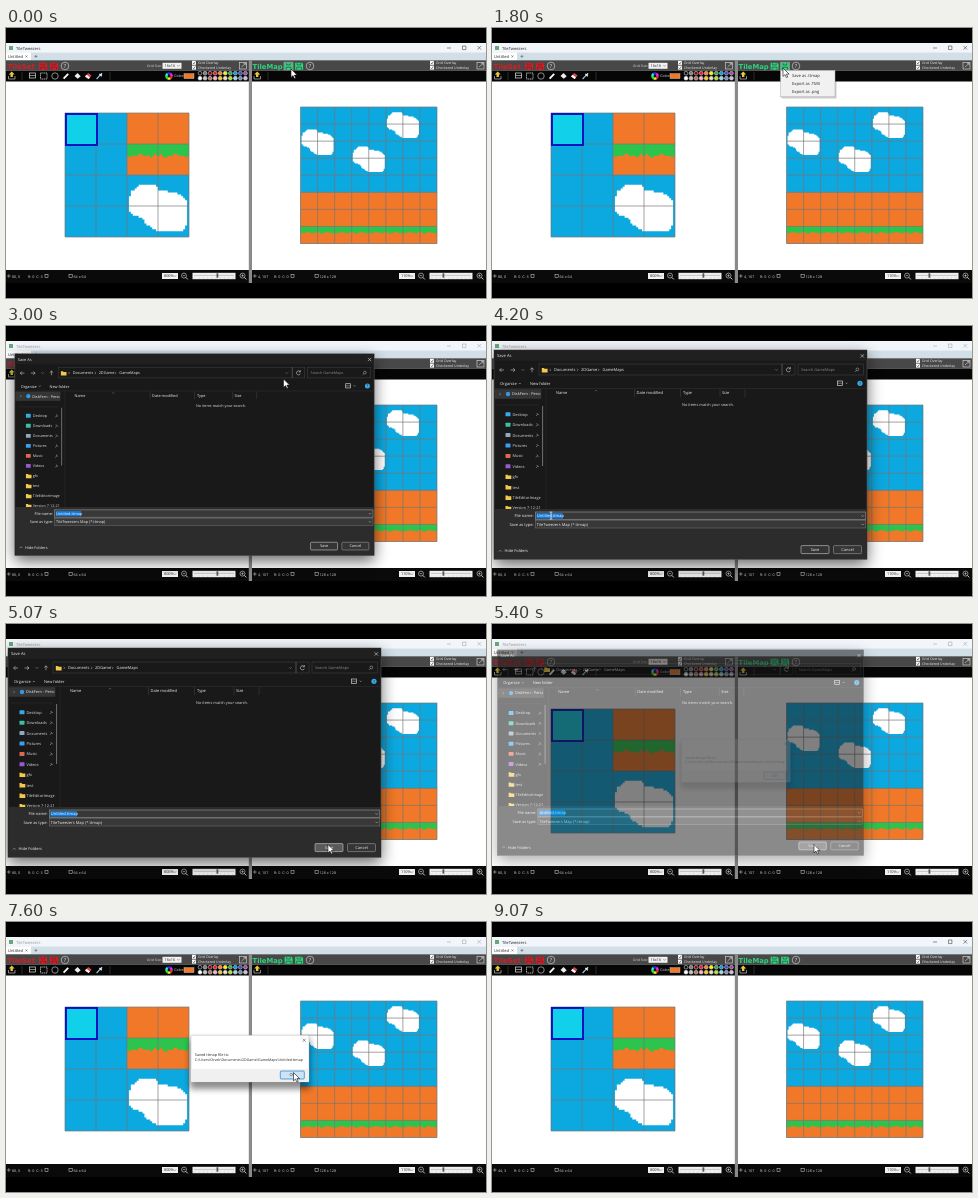
These frames come from a looping animation (480x270 px, 9.59 s). An HTML page:

```html
<!DOCTYPE html>
<html lang="en">
<head>
<meta charset="utf-8">
<title>Saving a tile map</title>
<style>
html, body { margin: 0; width: 100%; height: 100%; overflow: hidden; background: #000; }
svg { display: block; width: 100vw; height: 100vh; }
text { font-family: "Open Sans", "Noto Sans", sans-serif; text-rendering: geometricPrecision; white-space: pre; }
text.logo { font-family: "DejaVu Sans", sans-serif; font-weight: bold; }
</style>
</head>
<body>
<svg id="stage" viewBox="0 0 480 270"></svg>
<script>
const LOOP = 9590, STEP = 1000 / 15;
const BLUE = '#0ca8e0', ORANGE = '#f07828', GREEN = '#2cc44c', RED = '#d81c24', MINT = '#2cd47c';

const rect = (x, y, w, h, fill, extra = '') =>
  `<rect x="${x}" y="${y}" width="${w}" height="${h}" fill="${fill}" ${extra}/>`;
const text = (x, y, s, fill = '#eee', size = 4, extra = '') =>
  `<text x="${x}" y="${y}" fill="${fill}" font-size="${size}" ${extra}>${s}</text>`;
const line = (d, stroke = '#ddd', width = 0.6, extra = '') =>
  `<path d="${d}" fill="none" stroke="${stroke}" stroke-width="${width}" ${extra}/>`;
const ring = (x, y, r, stroke = '#ddd', fill = 'none') =>
  `<circle cx="${x}" cy="${y}" r="${r}" fill="${fill}" stroke="${stroke}" stroke-width=".6"/>`;
const group = (body, extra = '') => `<g ${extra}>${body}</g>`;
const range = n => [...Array(n).keys()];

// Interpolates a list of [key, ...values] rows.
function track(rows, k, ease = p => p) {
  if (k <= rows[0][0]) return rows[0].slice(1);
  for (let i = 1; i < rows.length; i++) {
    const a = rows[i - 1], b = rows[i];
    if (k <= b[0]) {
      const p = ease((k - a[0]) / (b[0] - a[0]));
      return a.slice(1).map((v, j) => v + (b[j + 1] - v) * p);
    }
  }
  return rows[rows.length - 1].slice(1);
}

// Tile art in image pixels; one tile is 16 by 16.
const cloudEdges = [[5, 6, 14], [7, 4, 15], [8, 2, 20], [9, 2, 25], [11, 1, 28], [13, 1, 30],
  [18, 1, 30], [20, 3, 30], [22, 8, 30], [25, 10, 30], [28, 15, 28]];
function cloud(x, y) {
  const rows = range(24).map(i => [i + y + 5, ...track(cloudEdges, i + 5).map(Math.round)]);
  const right = rows.map(([top, , r]) => `H${x + r + 1}V${top + 1}`).join('');
  const left = rows.reverse().map(([top, l]) => `H${x + l}V${top}`).join('');
  return `<path d="M${x + 6} ${y + 5}${right}${left}z" fill="#fff"/>`;
}
function grass(x, y) {
  const edge = range(32).map(i => {
    const depth = Math.round(5.9 + 0.55 * Math.sin(i * 0.7) + 0.3 * Math.sin(i * 1.7));
    return `V${y + depth}H${x + i + 1}`;
  }).join('');
  return `<path d="M${x} ${y}${edge}V${y}z" fill="${GREEN}"/>`;
}

function grid(x, y, size, cells) {
  const step = size / cells;
  const d = range(cells + 1).map(i =>
    `M${x + i * step} ${y}v${size}M${x} ${y + i * step}h${size}`).join('');
  return line(d, '#767676', 0.8, 'opacity=".85"');
}

function tileSet() {
  const art = rect(0, 0, 64, 64, BLUE) + rect(32, 0, 32, 32, ORANGE) + grass(32, 16) + cloud(32, 32);
  return group(art, 'transform="translate(59 85) scale(1.9375)"') + grid(59, 85, 124, 4) +
    rect(60, 86, 31, 31, '#10d0ea', 'stroke="#0814c0" stroke-width="2"');
}

function tileMap() {
  const art = rect(0, 0, 128, 128, BLUE) + rect(0, 80, 128, 48, ORANGE) +
    range(4).map(i => grass(i * 32, 112)).join('') +
    cloud(0, 16) + cloud(48, 32) + cloud(80, 0);
  return group(art, 'transform="translate(294.5 79) scale(1.0664)"') + grid(294.5, 79, 136.5, 8);
}

const disk = (x, color, id = '') => group(
  rect(x - 0.5, 33.8, 10, 8.5, '#8a8a8a', 'class="hover" opacity="0"') +
  `<path d="M${x + 0.6} 34.8h6.8l1.2 1.2v5.8h-8z" fill="${color}"/>` +
  line(`M${x + 2.6} 35.2v1.8h3.6v-1.8M${x + 2.2} 41.6v-2.4h4.8v2.4`, '#333', 0.6), id);
const help = x => ring(x, 38, 3.8) + text(x, 40, '?', '#ddd', 5.5, 'text-anchor="middle"');
const check = (x, y, label) => rect(x, y, 4, 4, '#fff') +
  line(`M${x + 0.8} ${y + 2}l1 1.1 1.6-2.3`, '#222', 0.6) + text(x + 6, y + 3.4, label, '#eee', 3.5);
const checks = x => check(x, 32.8, 'Grid Overlay') + check(x, 37.6, 'Checkered Underlay');
const expand = x => rect(x, 34.5, 7, 6.5, 'none', 'stroke="#ddd" stroke-width=".6"') +
  line(`M${x + 2} 39l4-3.5M${x + 4} 35.3h2.2v2`);
const upload = x => line(`M${x} 48v3h6.5v-3`) +
  `<path d="M${x + 3.2} 43.4l3 3h-1.8v2.6h-2.4v-2.6h-1.8z" fill="#e8c83c"/>`;
const combo = (x, y, w, label) => rect(x, y, w, 6, '#f0f0f0') + text(x + 2, y + 4.4, label, '#222', 3.8) +
  line(`M${x + w - 4} ${y + 2.5}l1 1 1-1`, '#333', 0.5);
const lens = (x, sign) => ring(x, 247.6, 2.5) + line(`M${x + 1.8} 249.4l2 2`, '#ddd', 0.9) +
  line(`M${x - 1.2} 247.6h2.4${sign > 0 ? `M${x} 246.4v2.4` : ''}`);

function statusBar(x, w, size, ids) {
  const page = x + 63;
  return rect(x, 242, w, 13, '#0a0a0a') +
    line(`M${x + 1} 248h3.6M${x + 2.8} 246.2v3.6`, '#ddd', 0.5) +
    text(x + 6, 249.5, '', '#ddd', 3.7, `id="${ids[0]}"`) +
    text(x + 22, 249.5, '', '#ddd', 3.7, `id="${ids[1]}"`) +
    rect(x + 39, 246.5, 3, 3.2, 'none', 'stroke="#ddd" stroke-width=".5"') +
    rect(page, 246.5, 3.2, 3, 'none', 'stroke="#ddd" stroke-width=".5"') +
    text(page + 4.5, 249.5, size, '#ddd', 3.7);
}
const zoomBar = (x, zoom, thumb) => combo(x, 245, 16, zoom) + lens(x + 22, -1) + lens(x + 80.5, 1) +
  rect(x + 30.5, 244.8, 43, 6.4, '#f0f0f0') + line(`M${x + 32} 247.4h40`, '#bbb', 0.8) +
  line(range(10).map(i => `M${x + 33 + i * 4.2} 249.6v1`).join(''), '#999', 0.4) +
  rect(thumb, 245.3, 1.8, 4.4, '#555');

function palette() {
  const top = ['#111', '#7f7f7f', '#880015', '#ed1c24', '#ff7f27', '#fff200', '#22b14c', '#00a2e8', '#3f48cc', '#a349a4'];
  const low = ['#fff', '#c3c3c3', '#b97a57', '#ffaec9', '#ffc90e', '#efe4b0', '#b5e61d', '#99d9ea', '#7092be', '#c8bfe7'];
  return [top, low].map((row, r) => row.map((c, i) => ring(194 + i * 5.05, 45.2 + r * 5, 1.9, '#ccc', c)).join('')).join('');
}

function tools() {
  return upload(2.5) + line('M16 44v8M104 44v8', '#444', 0.6) +
    rect(23.5, 45, 6, 5, 'none', 'stroke="#ddd" stroke-width=".7"') + line('M23.5 47.5h6') +
    rect(34.5, 45, 6.5, 6, 'none', 'stroke="#ddd" stroke-width=".8" stroke-dasharray="1.2 .6"') +
    ring(49, 48, 3.2) +
    line('M57.6 50.6l4.6-4.8', '#fff', 1.8) +
    `<path d="M68.5 48l3-3 3.2 3.2-3 2.6z" fill="#eee"/>` +
    `<path d="M79 48.4l3.2-3.4 3.4 2.6-3 3.4z" fill="#e04848"/><path d="M79 48.4l1.6-1.7 3.4 2.7-1.4 1.6z" fill="#fff"/>` +
    line('M90.6 51l3.6-3.8', '#9cd0e8', 1.1) + line('M93.4 46l2.4 2.2M94.6 47l1.4-1.6', '#eee', 1.4);
}

function wheel(x, y) {
  return range(6).map(i => {
    const p = a => `${x + 3.8 * Math.cos(a)} ${y + 3.8 * Math.sin(a)}`;
    const a = i * Math.PI / 3;
    return `<path d="M${x} ${y}L${p(a)}A3.8 3.8 0 0 1 ${p(a + Math.PI / 3)}z" fill="hsl(${i * 60} 85% 55%)"/>`;
  }).join('') + `<circle cx="${x}" cy="${y}" r="1.4" fill="#111"/>`;
}

function appWindow() {
  return rect(0, 15, 480, 240, '#fff') +
    rect(0, 15, 480, 9.5, '#f2f6fa') + rect(3, 18, 4, 4, '#68a878') +
    group(text(10, 21.6, 'TileTweezers', 'currentColor', 4.1) +
      line('M441 20h4M456.5 18h3.4v3.6h-3.4zM471.5 18l3.6 3.6m0-3.6l-3.6 3.6', 'currentColor', 0.5), 'id="titleBar"') +
    rect(0, 24.5, 480, 8, '#d2dfe7') + rect(0, 24.5, 25, 8, '#fff') +
    text(2, 29.9, 'Untitled', '#222', 4) + line('M19.4 27.4l2 2m0-2l-2 2M28.4 28.4h3M29.9 26.9v3', '#444', 0.5) +
    rect(0, 32.3, 480, 10.2, '#484848') + rect(0, 42.5, 480, 11, '#060606') +
    text(1.5, 40.8, 'TileSet', RED, 7, 'class="logo"') +
    disk(32.5, RED) + disk(43.5, RED) + help(59) +
    text(141, 39.3, 'Grid Size:', '#ddd', 3.4) + combo(156.5, 34.8, 19, '16x16') + checks(186) + expand(233.5) +
    tools() + wheel(163, 48) + text(168.2, 49.3, 'Color:', '#eee', 3.6) +
    rect(178, 45.6, 10, 5, ORANGE, 'stroke="#ccc" stroke-width=".4"') + palette() +
    text(246.5, 40.8, 'TileMap', MINT, 6.8, 'class="logo"') +
    disk(278, MINT, 'id="saveIcon"') + disk(288.5, MINT, 'id="saveAsIcon"') + help(304) +
    checks(424) + expand(471) + upload(248) + line('M262 44v8', '#444', 0.6) +
    tileSet() + tileMap() +
    statusBar(0, 243, '64 x 64', ['leftPos', 'leftCell']) + zoomBar(156, '800%', 210.5) +
    statusBar(246, 234, '128 x 128', ['rightPos', 'rightCell']) + zoomBar(393, '110%', 436.5) +
    rect(242.8, 32.3, 3.2, 222.7, '#8a8a8a');
}

function menu() {
  return rect(289.5, 43.5, 55, 27, '#000', 'opacity=".2"') +
    rect(288.5, 42.3, 54.5, 26.5, '#f1f1f1', 'stroke="#aaa" stroke-width=".5"') +
    rect(289.2, 44, 53, 8, '#c4def4', 'id="menuHover"') +
    ['Save as .ttmap', 'Export as .TMX', 'Export as .png'].map((s, i) => text(300, 49.4 + i * 8, s, '#222', 4.1)).join('');
}

const folder = (x, y) => `<path d="M${x} ${y - 2}h2l.8.8h3v3.6h-5.8z" fill="#f4c84c"/>`;
const button = (x, y, w, label, id, fill, ink, stroke) =>
  rect(x, y, w, 8, fill, `id="${id}" rx="1" stroke="${stroke}" stroke-width=".6"`) +
  text(x + w / 2, y + 5.4, label, ink, 4, 'text-anchor="middle"');

function saveDialog() {
  const places = ['Desktop', 'Downloads', 'Documents', 'Pictures', 'Music', 'Videos',
    'gfx', 'test', 'TileEditorImage', 'Version 7-12-21'];
  const tints = ['#38a8e8', '#3cc0a0', '#90a8c0', '#38a0f0', '#e06850', '#9858d0'];
  const icon = (i, y) => i < 6 ? rect(13.5, y - 2, 5, 4, tints[i], 'rx=".6"') : folder(13.5, y);
  const sidebar = places.map((name, i) => {
    const y = 88.3 + i * 10.4;
    return icon(i, y) + text(20.5, y + 1.5, name, '#ddd', 3.9) +
      (i < 6 ? line(`M44 ${y + 1.6}l1.5-1.5M44.7 ${y - 1.3}l2 2`, '#bbb', 0.6) : '');
  }).join('');
  const chevron = x => line(`M${x} 42.7l1.2 1.2-1.2 1.2`, '#bbb', 0.5);
  return rect(2, 29, 373, 210, '#000', 'opacity=".6" filter="url(#deep)"') +
    rect(2, 24, 373, 209.3, '#191919', 'stroke="#555" stroke-width=".6"') +
    rect(2.3, 24.3, 372.4, 10.5, '#202020') + text(5, 31.4, 'Save As', '#eee', 4.1) +
    line('M368.6 28.2l3.4 3.4m0-3.4l-3.4 3.4', '#ddd', 0.6) +
    line('M12 44h-4.4m1.8-1.8l-1.8 1.8 1.8 1.8M18.6 44h4.4m-1.8-1.8l1.8 1.8-1.8 1.8M40 46.2v-4.4m-1.8 1.8l1.8-1.8 1.8 1.8', '#ccc', 0.6) +
    line('M29.5 43.2l1.4 1.4 1.4-1.4', '#999', 0.5) +
    rect(47, 38, 256, 11, '#191919', 'stroke="#444" stroke-width=".5"') + folder(49.8, 44) +
    [57.6, 85, 106].map(chevron).join('') +
    text(62, 45.4, 'Documents') + text(89, 45.4, '2DGame') + text(110.5, 45.4, 'GameMaps') +
    line('M283 43.2l1.4 1.4 1.4-1.4M290 38v11', '#888', 0.5) + line('M298.2 42.6a2.1 2.1 0 1 0 .2 2M298.4 41v1.8h-1.8', '#ccc', 0.6) +
    rect(306, 38, 65.5, 11, '#191919', 'stroke="#444" stroke-width=".5"') + text(309, 45.4, 'Search GameMaps', '#888', 3.9) +
    ring(365.4, 43.4, 1.4, '#aaa') + line('M364.4 44.5l-1.4 1.4', '#aaa') +
    text(8, 59, 'Organize') + line('M26.8 57l1 1 1-1', '#ccc', 0.5) + text(38, 59, 'New folder') +
    rect(345.5, 55, 5, 4.4, 'none', 'stroke="#ccc" stroke-width=".7"') + line('M345.5 57.2h5M353.6 56.7l1 1 1-1', '#ccc', 0.5) +
    `<circle cx="368" cy="57.3" r="2.6" fill="#38a8e8"/>` + text(368, 58.8, '?', '#111', 4, 'text-anchor="middle"') +
    line('M2.5 62.5h372', '#333', 0.5) +
    rect(2.5, 63.2, 46.8, 9.6, '#353535') + line('M7.5 66.8l1.2 1.2-1.2 1.2', '#aaa', 0.5) +
    `<circle cx="16" cy="68" r="2.2" fill="#3498e4"/>` +
    group(text(20, 69.4, 'DiskFern - Perso', '#eee', 3.9) + sidebar, 'clip-path="url(#sideClip)"') +
    line('M5 79h42', '#333', 0.4) + line('M50.6 80v60', '#888', 0.8) + line('M54 63v120', '#333', 0.5) +
    text(64, 68.4, 'Name') + text(144.5, 68.4, 'Date modified') + text(191, 68.4, 'Type') + text(230, 68.4, 'Size') +
    line('M142.5 63v8M188.5 63v8M228 63v8M253 63v8', '#444', 0.5) + line('M103 65.2l1-1 1 1', '#999', 0.5) +
    text(190, 79.5, 'No items match your search.', '#ddd', 3.9) +
    rect(2.3, 183, 372.4, 50, '#2c2c2c') +
    text(41.5, 191.3, 'File name:', '#eee', 4, 'text-anchor="end"') + text(41.5, 199.8, 'Save as type:', '#eee', 4, 'text-anchor="end"') +
    rect(43.3, 186, 330.5, 7.6, '#383838', 'stroke="#999" stroke-width=".6"') +
    rect(43.3, 194.6, 330.5, 7.4, '#383838', 'stroke="#777" stroke-width=".5"') +
    rect(44.4, 187.2, 26.4, 5.4, '#1478d4') + text(44.8, 191.3, 'Untitled.ttmap', '#fff') +
    text(44.8, 199.8, 'TileTweezers Map (*.ttmap)') +
    line('M369.5 189.3l1.2 1.2 1.2-1.2M369.5 197.8l1.2 1.2 1.2-1.2M7 225.6l1.4-1.4 1.4 1.4', '#ccc', 0.5) +
    text(12.5, 226.3, 'Hide Folders') +
    button(309, 219.6, 28, 'Save', 'saveButton', '#353535', '#eee', '#ccc') +
    button(341.5, 219.6, 28, 'Cancel', 'cancelButton', '#353535', '#eee', '#999');
}

function message() {
  return rect(184, 117, 120, 50, '#000', 'opacity=".45" filter="url(#soft)"') +
    rect(185, 113.3, 118, 46.7, '#fff', 'rx="1.5" stroke="#aaa" stroke-width=".4"') +
    rect(185.2, 147, 117.6, 12.8, '#f0f0f0') +
    line('M296.6 116.6l3.2 3.2m0-3.2l-3.2 3.2', '#333', 0.5) +
    text(188.8, 134.4, 'Saved ttmap file to:', '#222', 3.8) +
    text(188.8, 138.9, 'C:\\Users\\Orvek\\Documents\\2DGame\\GameMaps\\Untitled.ttmap', '#222', 3.6) +
    button(274.3, 149, 24, 'OK', 'okButton', '#e0e8f0', '#222', '#0868b8');
}

const blur = (id, deviation) => `<filter id="${id}" x="-20%" y="-40%" width="140%" height="180%">` +
  `<feGaussianBlur stdDeviation="${deviation}"/></filter>`;
document.getElementById('stage').innerHTML =
  `<defs><clipPath id="sideClip"><rect x="2" y="62" width="46.5" height="121"/></clipPath>` +
  blur('soft', 3) + blur('deep', 8) + `</defs>` +
  rect(0, 0, 480, 270, '#000') + appWindow() +
  group(menu(), 'id="menu"') + group(message(), 'id="message"') + group(saveDialog(), 'id="dialog"') +
  group('<path d="M0 0v8.4l2-1.8 1.4 3 1.3-.6-1.3-2.9h2.7z" fill="#fff" stroke="#111" stroke-width=".6"/>', 'id="arrow"') +
  group(line('M-1.4-3.4h2.8M0-3.4v7M-1.4 3.6h2.8', '#eee', 0.7), 'id="beam"');

const $ = Object.fromEntries([...document.querySelectorAll('[id]')].map(e => [e.id, e]));
const pointer = [[70, 285, 41], [330, 289, 41], [1000, 289, 41], [1400, 291, 40], [2000, 291, 40],
  [2330, 305, 47], [2670, 305, 47], [3000, 277.5, 53], [3670, 277.5, 53], [4200, 59, 189.5], [4670, 59, 189.5],
  [5070, 322, 220.5], [5600, 322, 220.5], [6200, 287, 151], [6670, 287, 151], [6734, 287.5, 150.5],
  [7800, 287.5, 150.5], [8530, 144, 91], [8740, 132, 48]];
const smooth = p => p * p * (3 - 2 * p);
const ramp = (t, start, length) => Math.min(1, Math.max(0, (t - start) / length));
const easeOut = p => 1 - (1 - p) ** 2;

function pose(el, opacity, scale, cx, cy) {
  el.setAttribute('opacity', opacity);
  el.setAttribute('display', opacity > 0 ? 'inline' : 'none');
  el.setAttribute('transform', `translate(${cx} ${cy}) scale(${scale}) translate(${-cx} ${-cy})`);
}

function draw(time) {
  const t = Math.floor(time / STEP + 0.05) * STEP;
  const [x, y] = track(pointer, t, smooth);

  pose($.menu, ramp(t, 1590, 180) * (1 - ramp(t, 2660, 130)), 1, 316, 55);
  $.menuHover.setAttribute('opacity', ramp(t, 2130, 130));

  const closing = ramp(t, 5310, 200);
  pose($.dialog, ramp(t, 2860, 130) * (1 - closing),
    0.9 + 0.1 * easeOut(ramp(t, 2870, 330)) - 0.04 * closing, 188.5, 128.5);
  $.saveButton.setAttribute('fill', t > 5000 ? '#5a5a5a' : '#353535');

  const leaving = ramp(t, 7610, 190);
  pose($.message, ramp(t, 5350, 160) * (1 - leaving),
    0.88 + 0.12 * easeOut(ramp(t, 5350, 250)) - 0.06 * leaving, 244, 136.5);
  $.okButton.setAttribute('fill', t > 6990 ? '#cce4f7' : '#e0e8f0');

  $.titleBar.setAttribute('color', t > 2730 && t < 7720 ? '#999' : '#222');
  const overBar = y < 43 && t < 2000;
  $.saveIcon.querySelector('.hover').setAttribute('opacity', overBar && x < 288 ? 1 : 0);
  $.saveAsIcon.querySelector('.hover').setAttribute('opacity', overBar && x >= 288 ? 1 : 0);

  const moved = t > 8590;
  $.leftPos.textContent = moved ? '44, 3' : '80, 0';
  $.leftCell.textContent = moved ? 'R: 0  C: 2' : 'R: 0  C: 3';
  $.rightPos.textContent = '4, 107';
  $.rightCell.textContent = 'R: 0  C: 0';

  const typing = t > 3700 && t < 5300 && x > 43 && y > 186 && y < 194;
  const shown = t < 8790;
  for (const [el, on] of [[$.arrow, shown && !typing], [$.beam, shown && typing]]) {
    el.setAttribute('display', on ? 'inline' : 'none');
    el.setAttribute('transform', `translate(${x} ${y})`);
  }
}

const start = performance.now();
function tick() {
  draw((performance.now() - start) % LOOP);
  requestAnimationFrame(tick);
}
tick();
</script>
</body>
</html>
```
